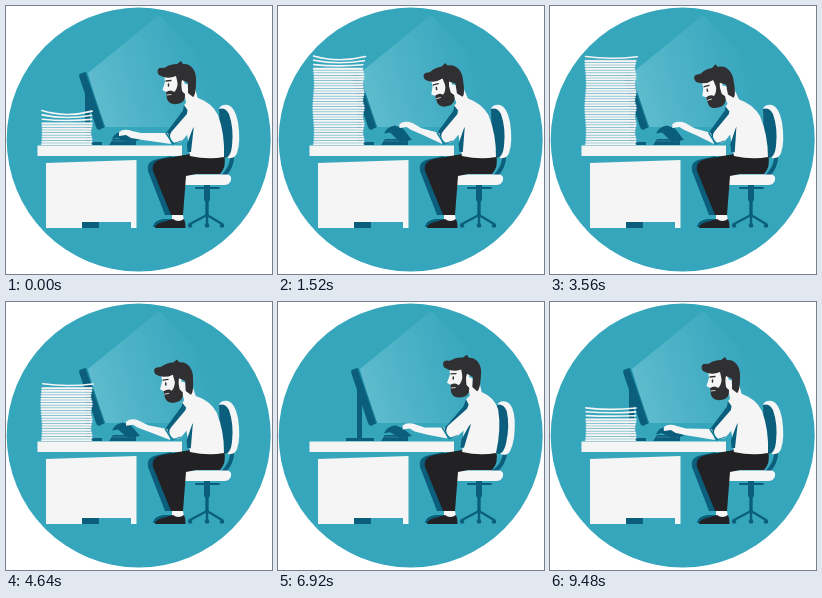
Write an HTML page with a canvas that moves like this. It is 266 by 268 pixels and loops after 9.52 s.

```html
<!DOCTYPE html>
<html lang="en">
<head>
<meta charset="utf-8">
<title>Desk work</title>
<style>
html, body { margin: 0; width: 100%; height: 100%; overflow: hidden; background: #fff; }
canvas { display: block; width: 266px; height: 268px; }
</style>
</head>
<body>
<canvas id="stage"></canvas>
<script>
const LOOP = 9520;
const TEAL = '#36a6bd', DEEP = '#0b5f7d', MID = '#15809c', WHITE = '#f5f5f5', BLACK = '#222124', HAIR = '#303033';
const canvas = document.getElementById('stage');
const ctx = canvas.getContext('2d');
const ratio = window.devicePixelRatio || 1;
canvas.width = 266 * ratio;
canvas.height = 268 * ratio;

// Each track is a list of [time, value] keys.
const tracks = {
  pile: [[0, 33], [760, 64], [1600, 89], [2400, 94], [3400, 94], [4640, 59], [5600, 0], [8680, 0], [LOOP, 33]],
  lean: [[0, 0], [760, -1], [2400, -3.5], [3700, -3], [4640, -2], [5000, 0], [5600, 18], [6200, 19], [6920, 12], [7700, 11], [8520, -3], [9480, 0], [LOOP, 0]],
  drop: [[0, 0], [760, 0], [2400, 1], [4640, 2], [5760, -3], [6920, -2], [7700, -2], [8520, 0], [LOOP, 0]],
  nod: [[0, 0], [760, -6], [2400, -12], [3700, -10], [4640, -3], [5760, 5], [6920, 3], [7700, 1], [8520, -11], [9480, 0], [LOOP, 0]]
};

function sample(keys, t, ease) {
  const i = Math.max(1, keys.findIndex(k => k[0] >= t));
  const [t0, a] = keys[i - 1], [t1, b] = keys[i];
  let u = (t - t0) / (t1 - t0);
  if (ease) u = u * u * (3 - 2 * u);
  return a + (b - a) * u;
}
const smooth = (name, t) => sample(tracks[name], t, true);

function fill(path, color) {
  ctx.fillStyle = color;
  ctx.fill(new Path2D(path));
}
function line(path, color, width) {
  ctx.strokeStyle = color;
  ctx.lineWidth = width;
  ctx.lineCap = ctx.lineJoin = 'round';
  ctx.stroke(new Path2D(path));
}
function disc(x, y, radius, color) {
  ctx.fillStyle = color;
  ctx.beginPath();
  ctx.arc(x, y, radius, 0, Math.PI * 2);
  ctx.fill();
}
function group(draw) {
  ctx.save();
  draw();
  ctx.restore();
}
function pivot(x, y, degrees) {
  ctx.translate(x, y);
  ctx.rotate(degrees * Math.PI / 180);
  ctx.translate(-x, -y);
}

function backdrop() {
  disc(132.7, 133.6, 132, TEAL);
  ctx.clip();
  const glow = ctx.createLinearGradient(84, 95, 205, 60);
  glow.addColorStop(0, 'rgba(125,203,218,.6)');
  glow.addColorStop(.5, 'rgba(110,195,212,.35)');
  glow.addColorStop(1, 'rgba(90,185,204,0)');
  fill('M82 67L153 9L245 105L215 121H98Z', glow);
}

function monitor() {
  fill('M79 86H84V136H96V139H68V136H79Z', DEEP);
  fill('M73 70Q73 68 76 67L80 66L99 121L93 124Q91 124 90 121Z', DEEP);
  line('M80.5 68L98 120', MID, 1);
}

function desk() {
  fill('M31.5 139.5H176V150H31.5Z', WHITE);
  fill('M40 157L130.5 154V222H125V216H76V222H40Z', WHITE);
  fill('M76 216H93V222H76Z', DEEP);
}

function papers(height, t) {
  const count = Math.floor(height / 2.6);
  if (count < 1) return;
  const growing = t < 1600 || t > 8680;
  const loose = growing ? 3 : 1;
  for (let i = 0; i < count; i++) {
    const y = 138.3 - i * 2.6;
    const left = 36.2 + Math.sin(i * 12.9) * .7, right = 84.8 + Math.sin(i * 7.3) * .7;
    const flutter = Math.max(0, i - count + 1 + loose) / loose;
    const sag = flutter * (growing ? 5 + 6 * Math.sin(t / 160 - 3.2) : 2.5);
    const lift = flutter * loose;
    const sheet = `M${left} ${y - lift - sag * .4}Q60 ${y - lift + sag} ${right + flutter * 2} ${y - lift - sag * .3}`;
    if (!flutter) line(sheet, '#a5cfda', 2.6);
    line(sheet, WHITE, 1.6);
  }
}

function chair(tilt) {
  line('M201 180V210', DEEP, 3.4);
  line('M201 180V193', DEEP, 6);
  line('M190 182H213', DEEP, 2);
  line('M184 218L201 209L216 218M201 209V219', DEEP, 2.4);
  for (const x of [184, 201, 216]) disc(x, 219.5, 2.3, DEEP);
  group(() => {
    pivot(219, 160, tilt);
    line('M226 148Q227 162 215 172', DEEP, 4);
    fill('M213 103Q215 98 222 99Q229 101 232 116Q235 136 231 147Q229 153 222 152L216 149Z', WHITE);
    fill('M213 103Q219 101 223 108Q228 122 226 140Q225 150 220 152L214 149Z', DEEP);
  });
  fill('M177 168.5H221Q226 169 225 174Q224 179 218 179H181Q173 179 173 173Q173 169 177 168.5Z', WHITE);
}

function legs() {
  fill('M165 150L148 154Q140 157 142 165L159 209H168L170 158Z', DEEP);
  fill('M147 221Q147 215 157 213H168V221Z', DEEP);
  fill('M184 148H218Q221 161 214 168H190L180 170L177 209H165L147 165Q145 155 156 153Z', BLACK);
  fill('M166 209H177L178 215H166Z', WHITE);
  fill('M167 213Q172 217 178 213Q180 217 179.5 222H149Q150 217 157 216Z', BLACK);
}

function torso() {
  fill('M178 99Q184 91 192 92Q206 97 212 109Q219 128 218 151Q202 154 184 150Q181 128 178 99Z', WHITE);
  fill('M178 99L181.5 104L180 115L176 110Z', DEEP);
  fill('M188 119L185 146L181.5 146L181 138Z', DEEP);
}

function head() {
  fill('M177 82H189L193 97L181 101Z', WHITE);
  fill('M158 67H178L179 91L163 92L160 86L156.5 84L159 76Z', WHITE);
  fill('M153 69C150 65 152 61 157 62C160 62 162 58 171 58L175 55L177 58C185 57 191 65 190 75C190 84 189 90 187 91L182 87V77L176 74L175 79L172 79L170 70Q161 74 153 69Z', HAIR);
  fill('M172 76L175 76L176 85L179 88Q180 97 171 98Q163 99 161 93L160 86Q165 83 168 86Q171 84 172 76Z', HAIR);
  fill('M176 79Q179 76 182 79Q182 85 178 87Q176 85 176 79Z', WHITE);
  line('M160 75L165 74.5', HAIR, 1.3);
  line('M162.5 78V80', HAIR, 1.5);
  line('M161 89L165 88.5', WHITE, .8);
}

function farArm(lean, lift) {
  const shoulder = 180 + lean * .7;
  line(`M${shoulder} 108L${165 + lean * .5} 128`, DEEP, 9);
  const y = 128 - lift * .7;
  fill(`M106 ${y + 5}Q109 ${y - 2} 117 ${y - 3}L125 ${y}L134 134L122 136L112 ${y + 4}Z`, DEEP);
}

function keyboard() {
  fill('M107 133H130V139H103Z', DEEP);
  line('M107 135H128', '#4b9bb2', .6);
}

function arm(lean, lift) {
  const reach = lean > 0 ? lean * .8 : -lean;
  const hx = 113 + reach + lift * .8, hy = 126 - lift;
  const ex = 165 + lean * .35, ey = 136 - Math.max(0, lean) * .12;
  const sx = 191 + lean * .7, sy = 107;
  line(`M${sx} ${sy}L${ex + 6} ${ey - 6}`, WHITE, 14);
  fill(`M${hx} ${hy}Q${hx + 5} ${hy - 4} ${hx + 13} ${hy - 1}L${hx + 22} ${hy + 1 + lift * .4}L${ex - 3} ${ey - 9}L${ex} ${ey + 2}L${hx + 24} ${hy + 8 + lift * .4}L${hx + 12} ${hy + 6}L${hx + 7} ${hy + 3}L${hx} ${hy + 4}Z`, WHITE);
  line(`M${ex - 5} ${ey - 9}L${ex + 2} ${ey + 2}`, MID, 1.6);
  line(`M${ex + 2} ${ey + 2}L${ex + 10} ${ey - 1}`, MID, 1);
}

function render(t) {
  const lean = smooth('lean', t), drop = smooth('drop', t), nod = smooth('nod', t);
  const lift = (8 - Math.max(0, lean) * .4) * Math.sin(Math.PI * t / 340) ** 2;
  ctx.setTransform(ratio, 0, 0, ratio, 0, 0);
  ctx.clearRect(0, 0, 266, 268);
  group(() => {
    backdrop();
    monitor();
    chair(Math.max(0, lean) * .52);
    desk();
    papers(sample(tracks.pile, t), t);
    legs();
    keyboard();
    farArm(lean, lift);
    group(() => {
      const shear = -lean / 62;
      const scale = 1 - drop / 60;
      ctx.transform(1, 0, shear, scale, -shear * 151, 151 * (1 - scale));
      torso();
    });
    group(() => {
      ctx.translate(lean, drop);
      pivot(182, 93, nod);
      head();
    });
    arm(lean, lift);
  });
}

function tick() {
  render(performance.now() % LOOP);
  requestAnimationFrame(tick);
}
tick();
</script>
</body>
</html>
```
